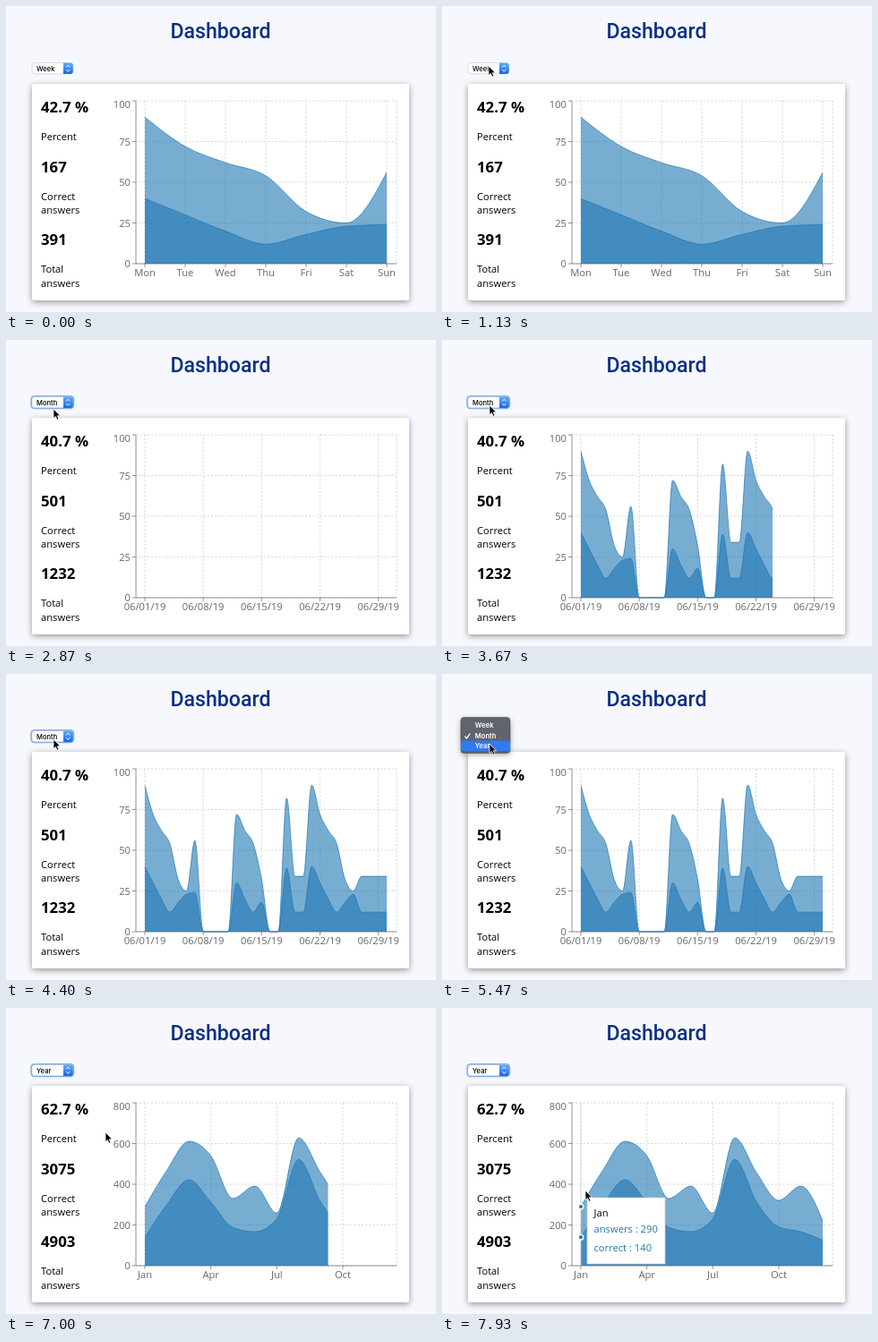
These frames come from a looping animation (480x342 px, 8 s). An HTML page:

```html
<!DOCTYPE html>
<html lang="en">
<head>
<meta charset="utf-8">
<title>Dashboard</title>
<style>
  html, body { margin: 0; width: 100%; height: 100%; overflow: hidden; background: #f6f8fd; }
  svg { display: block; font: 11.2px "Open Sans", "Noto Sans", sans-serif; }
  .title { font: 500 23.1px Roboto, sans-serif; fill: #0b2f83; text-anchor: middle; }
  .card { fill: #fff; filter: drop-shadow(0 2px 3.5px rgba(0, 0, 0, .4)); }
  .stat { font-size: 16.8px; font-weight: 700; }
  .axis { stroke: #666; stroke-width: .7; fill: none; }
  .grid { stroke: #ccc; stroke-width: .8; stroke-dasharray: 2.1; fill: none; }
  .tick { fill: #666; }
  .end { text-anchor: end; }
  .mid { text-anchor: middle; }
  .area { fill: #1f77b4; fill-opacity: .6; }
  .line { fill: none; stroke: #1f77b4; stroke-width: .7; }
  .ui { font: 500 7.6px Inter, sans-serif; }
  .menu text { font-weight: 600; fill: #fff; }
  .dot { fill: #1f77b4; stroke: #fff; stroke-width: 1.4; }
  .item { fill: #1f77b4; }
</style>
</head>
<body>
<svg width="480" height="342" viewBox="0 0 480 342">
  <defs>
    <clipPath id="clip"><rect id="reveal" x="155" y="100" width="270" height="195"/></clipPath>
    <linearGradient id="knob" x2="0" y2="1">
      <stop stop-color="#66abf8"/><stop offset="1" stop-color="#1768ee"/>
    </linearGradient>
  </defs>
  <text class="title" x="239.5" y="36">Dashboard</text>
  <rect id="ring" x="27.4" y="62" width="48.8" height="15.2" rx="4.5" fill="#74a9f2"/>
  <rect x="29" y="63.6" width="45.6" height="12.2" rx="3" fill="#fff" stroke="#c4c6ca" stroke-width=".6"/>
  <path d="M64 63.4h7.8a3 3 0 0 1 3 3v6.6a3 3 0 0 1-3 3h-7.8z" fill="url(#knob)"/>
  <path d="M67.4 68.3l2-2.2 2 2.2m-4 2.8l2 2.2 2-2.2" fill="none" stroke="#fff" stroke-width="1"/>
  <rect class="card" x="29" y="87" width="421" height="242" rx="2"/>
  <g id="views"></g>
  <g id="tip">
    <path d="M155 106V288" stroke="#ccc" stroke-width=".7"/>
    <circle class="dot" cx="155" cy="222" r="2.8"/>
    <circle class="dot" cx="155" cy="256.2" r="2.8"/>
    <g id="box">
      <rect width="87" height="74" fill="#fff" stroke="#ccc" stroke-width=".7"/>
      <text x="7.5" y="20.5">Jan</text>
      <text class="item" x="7.5" y="39">answers : 290</text>
      <text class="item" x="7.5" y="60">correct : 140</text>
    </g>
  </g>
  <g id="menu" class="menu ui"></g>
  <path id="pointer" d="M0 0V10.6L2.4 8.4 4.1 12.2 5.9 11.4 4.3 7.7H7.6Z" stroke="#fff" stroke-width=".8"/>
</svg>
<script>
const $ = id => document.getElementById(id);
const LEFT = 145, RIGHT = 436, TOP = 106, BASE = 288, X0 = 155, SPAN = 270;
const ROW = 11.3, PAD = 3.5;

const week = { answers: [90, 72, 62, 54, 32, 25, 56], correct: [40, 30, 20, 12, 18, 23, 24] };
// A month repeats the week's data, with gaps and a few quiet days.
const month = (w, peak, low) => [...w, 0, 0, 0, 0, ...w.slice(1, 5), 0, 0, peak, low, low,
  ...w.slice(0, 6), low, low, low, low];

const views = [
  { name: 'Week', stats: ['42.7 %', 167, 391], max: 100, every: 1,
    labels: ['Mon', 'Tue', 'Wed', 'Thu', 'Fri', 'Sat', 'Sun'], ...week },
  { name: 'Month', stats: ['40.7 %', 501, 1232], max: 100, every: 7,
    labels: ['01', '08', '15', '22', '29'].map(d => `06/${d}/19`),
    answers: month(week.answers, 82, 34), correct: month(week.correct, 39, 12) },
  { name: 'Year', stats: ['62.7 %', 3075, 4903], max: 800, every: 3,
    labels: ['Jan', 'Apr', 'Jul', 'Oct'],
    answers: [290, 468, 611, 540, 330, 391, 258, 628, 455, 321, 391, 220],
    correct: [140, 300, 422, 312, 188, 167, 230, 522, 312, 190, 167, 125] },
];
const picks = [
  { open: 1600, pick: 2470, swap: 2800, reveal: 2935 },
  { open: 4730, pick: 5870, swap: 6200, reveal: 6314 },
];
const track = [[0, -20, 110], [600, -10, 110], [1130, 52, 67], [2000, 52, 67], [2330, 53, 77],
  [3330, 53, 77], [3660, 53, 73], [4950, 53, 73], [5470, 53, 78], [6450, 53, 78],
  [6950, 111, 139], [7600, 111, 139], [7900, 160, 204], [8000, 160, 204]];

const text = (x, y, s, cls = '') => `<text x="${x}" y="${y}" class="${cls}">${s}</text>`;

// Monotone cubic through evenly spaced points.
function curve(values, max) {
  const n = values.length, dx = SPAN / (n - 1);
  const y = values.map(v => BASE - v / max * (BASE - TOP));
  const slope = i => y[i + 1] - y[i];
  const m = y.map((_, i) => {
    if (!i || i === n - 1) return 0;
    const a = slope(i - 1), b = slope(i);
    return (Math.sign(a) + Math.sign(b)) * Math.min(Math.abs(a), Math.abs(b), Math.abs(a + b) / 4);
  });
  m[0] = (3 * slope(0) - m[1]) / 2;
  m[n - 1] = (3 * slope(n - 2) - m[n - 2]) / 2;
  let d = `M${X0} ${y[0]}`;
  for (let i = 1; i < n; i++) {
    const x = X0 + i * dx;
    d += `C${x - dx * 2 / 3} ${y[i - 1] + m[i - 1] / 3} ${x - dx / 3} ${y[i] - m[i] / 3} ${x} ${y[i]}`;
  }
  return d;
}

function area(values, max) {
  const d = curve(values, max);
  return `<path class="area" d="${d}V${BASE}H${X0}Z"/><path class="line" d="${d}"/>`;
}

function viewMarkup(v) {
  let grid = `M${RIGHT} ${TOP}V${BASE}`, axis = `M${LEFT} ${TOP}V${BASE}H${RIGHT}`, out = '';
  for (let i = 0; i <= 4; i++) {
    const y = BASE - i * (BASE - TOP) / 4;
    grid += `M${LEFT} ${y}H${RIGHT}`;
    axis += `M${LEFT - 4} ${y}h4`;
    out += text(139, Math.max(y + 4, 114.3), v.max * i / 4, 'tick end');
  }
  v.labels.forEach((label, i) => {
    const x = X0 + i * v.every * SPAN / (v.answers.length - 1);
    grid += `M${x} ${TOP}V${BASE}`;
    axis += `M${x} ${BASE}v4`;
    out += text(x, 302, label, 'tick mid');
  });
  v.stats.forEach((s, i) => out += text(39, [119, 186, 267][i], s, 'stat'));
  out += text(39, 150, 'Percent') + text(39, 217, 'Correct') + text(39, 232, 'answers')
    + text(39, 298, 'Total') + text(39, 314, 'answers') + text(34, 72.5, v.name, 'ui');
  return `<g><path class="grid" d="${grid}"/><path class="axis" d="${axis}"/>${out}
    <g clip-path="url(#clip)">${area(v.answers, v.max)}${area(v.correct, v.max)}</g></g>`;
}

$('views').innerHTML = views.map(viewMarkup).join('');
$('menu').innerHTML = `<rect x="21" width="55" height="${3 * ROW + 2 * PAD - 1}" rx="3.5" fill="#5f646e"
    stroke="#43474f" stroke-width=".6" style="filter:drop-shadow(0 2px 3px rgba(0,0,0,.3))"/>
  <rect id="hover" x="21" width="55" height="${ROW}" fill="#2f7af5"/>
  <path id="check" d="M25.5 0l2 2.6 4-5.6" fill="none" stroke="#fff" stroke-width="1.2"/>`
  + views.map((v, i) => text(36.8, PAD + ROW * i + 8.4, v.name)).join('');

// Cubic-bezier(.25, .1, .25, 1)
function ease(p) {
  if (p <= 0) return 0;
  if (p >= 1) return 1;
  let lo = 0, hi = 1, s;
  for (let i = 0; i < 24; i++) {
    s = (lo + hi) / 2;
    if (.75 * s * (1 - s) + s ** 3 < p) lo = s; else hi = s;
  }
  return .3 * s * (1 - s) ** 2 + 3 * s * s * (1 - s) + s ** 3;
}

function pointerAt(t) {
  const i = track.findIndex(k => k[0] > t);
  const [t0, x0, y0] = track[i - 1], [t1, x1, y1] = track[i];
  const p = (t - t0) / (t1 - t0), s = p * p * (3 - 2 * p);
  return [x0 + (x1 - x0) * s, y0 + (y1 - y0) * s];
}

const show = (el, on) => el.style.display = on ? '' : 'none';

function drawMenu(t, y) {
  const from = picks.findIndex(p => t >= p.open && t < p.swap);
  show($('menu'), from >= 0);
  if (from < 0) return;
  const since = t - picks[from].pick;
  const top = 69 - ROW * (from + .5) - PAD;
  const row = Math.floor((y - top - PAD) / ROW);
  $('menu').setAttribute('transform', `translate(0 ${top})`);
  $('menu').style.opacity = Math.min(1, 1 - (since - 130) / 200);
  $('hover').setAttribute('y', PAD + ROW * row);
  show($('hover'), since < 0 || since >= 65);
  $('check').setAttribute('transform', `translate(0 ${PAD + ROW * from + 6})`);
}

function draw() {
  const t = performance.now() % 8000;
  const [x, y] = pointerAt(t);
  const current = picks.filter(p => t >= p.swap).length;
  [...$('views').children].forEach((g, i) => show(g, i === current));
  const shown = current ? ease((t - picks[current - 1].reveal) / 1500) : 1;
  $('reveal').setAttribute('width', SPAN * shown);
  show($('ring'), t >= picks[0].open);
  drawMenu(t, y);
  show($('tip'), x >= LEFT);
  $('box').setAttribute('transform', `translate(162 ${y + 8})`);
  $('pointer').setAttribute('transform', `translate(${x} ${y})`);
  requestAnimationFrame(draw);
}
draw();
</script>
</body>
</html>
```
